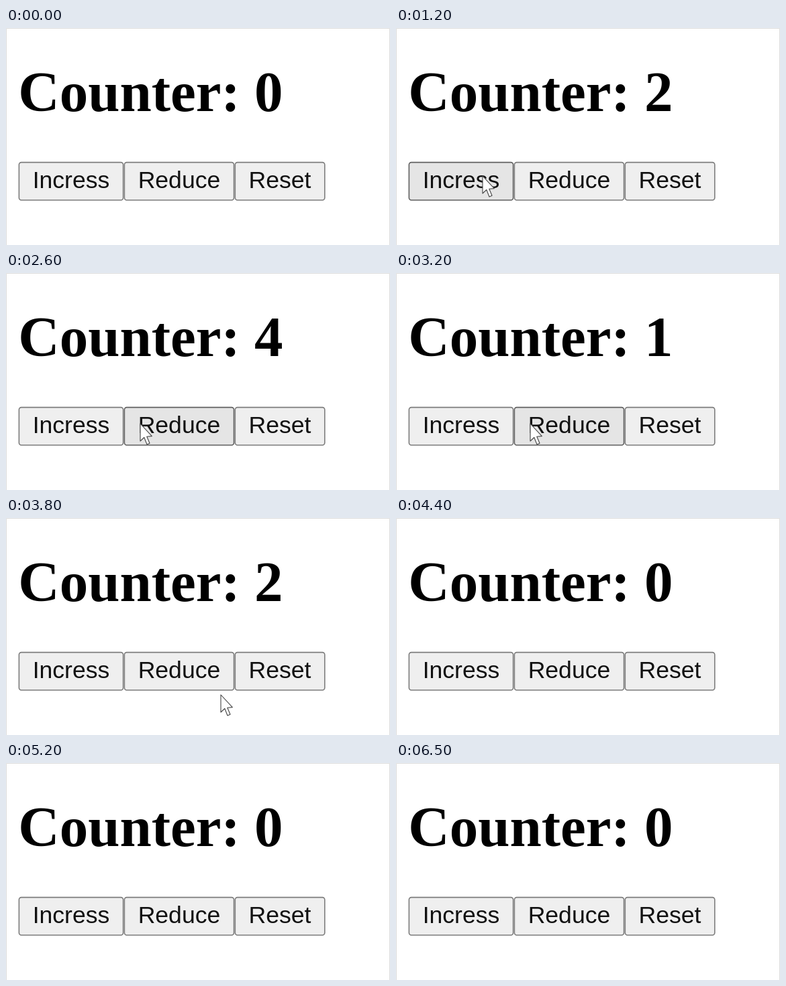
An HTML page for the animation above (6.7 s loop, 572 by 324 pixels).

```html
<!DOCTYPE html>
<html lang="en">
<head>
<meta charset="utf-8">
<title>Counter</title>
<style>
  html, body { margin: 0; width: 100%; height: 100%; overflow: hidden; background: #fff; }
  svg { display: block; width: 572px; height: 324px; }
  .title { font: bold 85px "Liberation Serif", "Times New Roman", serif; }
  .label { font: 35.56px "Liberation Sans", Arial, sans-serif; fill: #111; }
  .tip { font: bold 29.2px "Noto Sans Mono", "DejaVu Sans Mono", monospace; }
  .button rect { fill: #efefef; stroke: #7c7c7c; stroke-width: 1.6; }
  .button.hover rect { fill: #e5e5e5; stroke: #606060; }
  .content { fill: rgba(120, 170, 210, .7); }
  .padding { fill: rgba(77, 200, 0, .3); }
  .border { fill: rgba(255, 200, 50, .3); }
  .margin { fill: rgba(250, 160, 10, .3); }
</style>
</head>
<body>
<svg viewBox="0 0 572 324" xmlns="http://www.w3.org/2000/svg">
  <path d="M.5 324V.5H571.5V324" fill="none" stroke="#dcdcdc"/>
  <text class="title" x="18.3" y="124">Counter: <tspan id="count">0</tspan></text>
  <g id="buttons"></g>
  <g id="overlay" visibility="hidden">
    <path class="margin" d="M18.5 0H572V47H18.5ZM18.5 143.3H572V197.6H18.5Z"/>
    <rect class="content" x="18.5" y="47" width="553.5" height="96.3"/>
    <g id="boxes"></g>
    <rect x="32" y="269.5" width="423" height="53.5" rx="5" fill="#333740"/>
    <text class="tip" x="45.5" y="307.5" fill="#ee78e6">Counter</text>
    <path d="M191.3 279V315" stroke="#a5a8ad" stroke-width="1.5"/>
    <text class="tip" x="212.5" y="307.5" fill="#d7d7d7">465px × 100px</text>
  </g>
  <path id="cursor" d="M0 0V26L5.8 20.5L10 31L14 29.3L9.8 19.2L17.3 18.6Z"
        fill="#fff" stroke="#444" stroke-width="1.1" stroke-linejoin="round"/>
</svg>
<script>
const LOOP = 6700, STEP = 100;
const LEFT = 18.5, TOP = 200, HEIGHT = 57.6, BORDER = 5.2, PAD = 16, ARC = 4;
const SHOW = 100, HIDE = 4400;

// Each move glides to a point; the cursor rests in between.
const moves = [
  { from: 0, to: 100, x: 429, y: 234 },
  { from: 100, to: 650, x: 60, y: 234 },
  { from: 650, to: 900, x: 129, y: 221 },
  { from: 1700, to: 2250, x: 200, y: 225 },
  { from: 3200, to: 3500, x: 140, y: 230 },
  { from: 3500, to: 3700, x: 150, y: 246 },
  { from: 3700, to: 3800, x: 320, y: 264 },
  { from: 3800, to: 4100, x: 400, y: 230 },
  { from: 4100, to: 4400, x: 440, y: 240 }
];

const byId = id => document.getElementById(id);
const count = byId("count"), overlay = byId("overlay"), cursor = byId("cursor");
const clamp = (v, low, high) => Math.min(high, Math.max(low, v));
const show = (el, on) => el.setAttribute("visibility", on ? "visible" : "hidden");

function add(parent, tag, attrs, text = "") {
  const el = document.createElementNS("http://www.w3.org/2000/svg", tag);
  for (const key in attrs) el.setAttribute(key, attrs[key]);
  el.textContent = text;
  return parent.appendChild(el);
}

// Rectangular ring between two insets, drawn with the even-odd rule.
function ring(x, w, [ax, ay], [bx, by]) {
  const box = (dx, dy) =>
    `M${x + dx} ${TOP + dy}h${w - 2 * dx}v${HEIGHT - 2 * dy}h${2 * dx - w}Z`;
  return box(ax, ay) + box(bx, by);
}

function makeButton(label, x) {
  const el = add(byId("buttons"), "g", { class: "button" });
  const rect = add(el, "rect", { x: x + .9, y: TOP + .6, height: HEIGHT - 1.2, rx: 3.5 });
  const text = add(el, "text", { class: "label", x: x + BORDER + PAD, y: 239.1 }, label);
  const w = text.getComputedTextLength() + 2 * (BORDER + PAD);
  rect.setAttribute("width", w - 1.8);

  const outer = [0, 0], inner = [BORDER, BORDER], core = [BORDER + PAD, BORDER + 2.4];
  const boxes = byId("boxes");
  add(boxes, "path", { class: "border", "fill-rule": "evenodd", d: ring(x, w, outer, inner) });
  add(boxes, "path", { class: "padding", "fill-rule": "evenodd", d: ring(x, w, inner, core) });
  add(boxes, "rect", { class: "content", x: x + core[0], y: TOP + core[1],
    width: w - 2 * core[0], height: HEIGHT - 2 * core[1] });
  return { el, x, w };
}

let edge = LEFT;
const buttons = ["Incress", "Reduce", "Reset"].map(label => {
  const button = makeButton(label, edge);
  edge += button.w;
  return button;
});

function tipAt(t) {
  let x = 0, y = 0;
  for (const m of moves) {
    const k = clamp((t - m.from) / (m.to - m.from), 0, 1);
    const ease = k * k * (3 - 2 * k);
    x += (m.x - x) * ease;
    y += (m.y - y) * ease + ARC * Math.sin(Math.PI * k);
  }
  return [x, y];
}

// Evenly spaced clicks made so far.
const clicks = (t, first, gap, total) =>
  clamp(Math.floor((t - first) / gap) + 1, 0, total);

function valueAt(t) {
  if (t >= 4100) return 0;
  return clicks(t, 1000, 200, 5) - clicks(t, 2400, 265, 4) + clicks(t, 3500, STEP, 1);
}

function draw(t) {
  const [x, y] = tipAt(t);
  const visible = t >= SHOW && t < HIDE;
  show(cursor, visible);
  cursor.setAttribute("transform", `translate(${x} ${y})`);
  for (const b of buttons) {
    const over = x >= b.x && x < b.x + b.w && y >= TOP && y < TOP + HEIGHT;
    b.el.classList.toggle("hover", visible && over);
  }
  count.textContent = valueAt(t);
  show(overlay, t >= 4800 && t < 4900);
}

const start = performance.now();
function tick() {
  const t = (performance.now() - start) % LOOP;
  draw(Math.floor(t / STEP) * STEP);
  requestAnimationFrame(tick);
}
tick();
</script>
</body>
</html>
```
